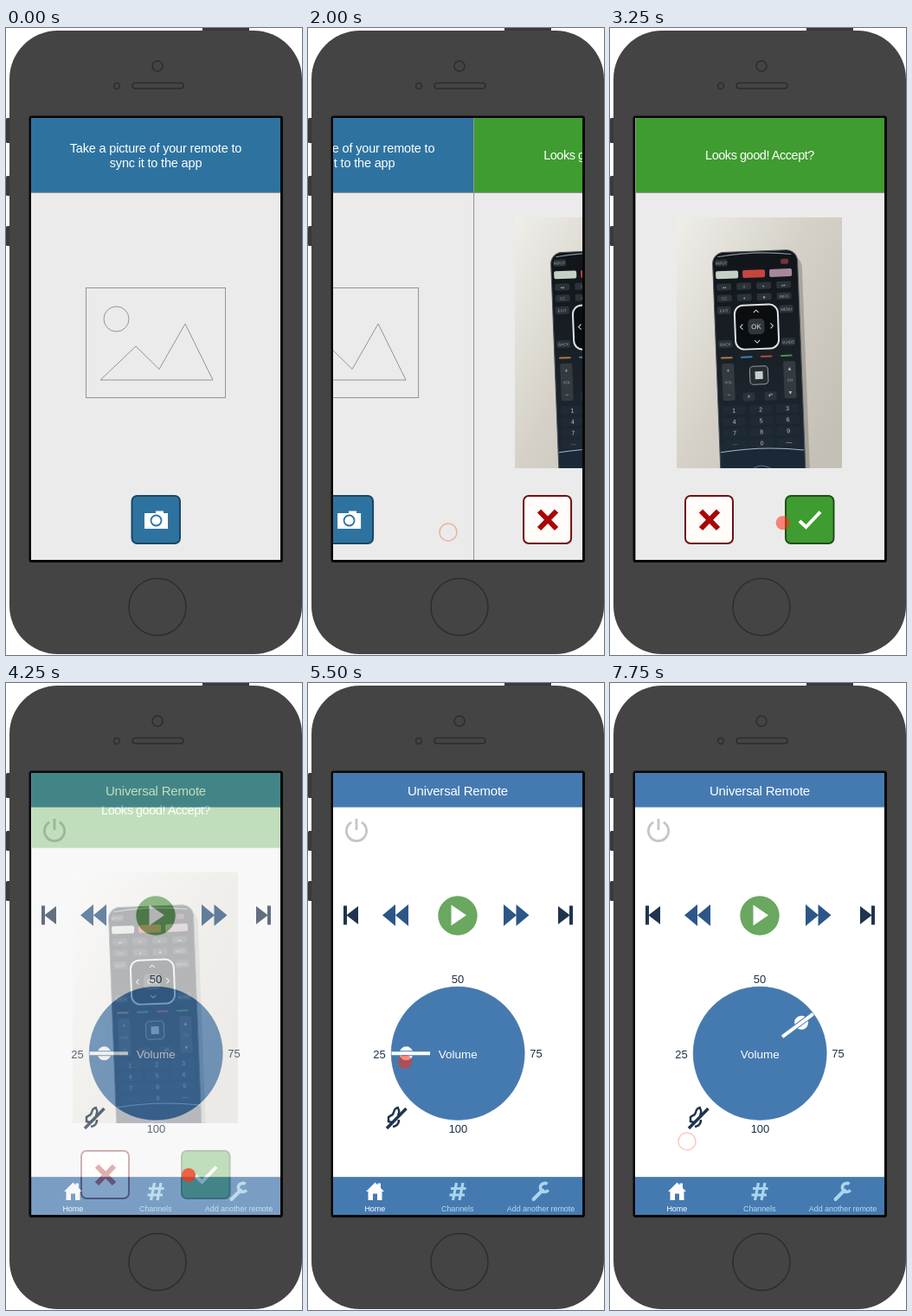
An HTML page that plays this animation: 342 by 725 pixels, repeating every 8 s.

```html
<!DOCTYPE html>
<html lang="en">
<head>
<meta charset="utf-8">
<title>Remote app demo</title>
<style>
html, body { margin: 0; width: 100%; height: 100%; overflow: hidden; background: #fff; }
svg { display: block; width: 342px; height: 725px; font-family: "Liberation Sans", Arial, sans-serif; -webkit-font-smoothing: antialiased; }
text { text-anchor: middle; }
.line { fill: none; stroke: #949494; }
.trim { fill: none; stroke: #2d2d2d; stroke-width: 1.5; }
.title { fill: #fff; font-size: 14.5px; }
.num { fill: #1d3149; font-size: 13px; }
.tab { font-size: 9px; letter-spacing: -.07px; }
.key { fill: #c3c8cb; font-size: 7px; }
.tiny { fill: #9ea5aa; font-size: 4.5px; }
</style>
</head>
<body>
<svg viewBox="0 0 342 725">
  <defs>
    <clipPath id="view"><rect x="29" y="104" width="288" height="511"/></clipPath>
    <clipPath id="crop"><rect x="77" y="219" width="191" height="290"/></clipPath>
    <linearGradient id="wall" x1="0" y1="0" x2="1" y2=".8">
      <stop offset="0" stop-color="#efeee9"/><stop offset=".5" stop-color="#d5d1c8"/><stop offset="1" stop-color="#c5c0b6"/>
    </linearGradient>
    <linearGradient id="shell" x1="0" y1="0" x2="0" y2="1">
      <stop offset="0" stop-color="#11151a"/><stop offset=".5" stop-color="#1b2229"/><stop offset="1" stop-color="#1c2c3e"/>
    </linearGradient>
  </defs>

  <!-- phone -->
  <g fill="#3a3a3a">
    <rect x="227" width="54" height="6"/>
    <rect y="104" width="7" height="29" rx="1.5"/>
    <rect y="171" width="7" height="23" rx="1.5"/>
    <rect y="229" width="7" height="23" rx="1.5"/>
  </g>
  <rect x="4" y="3" width="338" height="721" rx="56" fill="#444"/>
  <g class="trim">
    <circle cx="175" cy="44" r="6"/>
    <circle cx="128" cy="67" r="3.4"/>
    <rect x="146" y="63.500" width="59" height="6.500" rx="3.200"/>
    <circle cx="175" cy="669.500" r="33"/>
  </g>
  <rect x="26.500" y="101.500" width="293.500" height="516.500" rx="3" fill="#080808"/>

  <g clip-path="url(#view)">
    <!-- take picture -->
    <g id="take">
      <rect x="29" y="104" width="288" height="511" fill="#ebebeb"/>
      <rect x="29" y="104" width="288" height="86" fill="#2e73a0"/>
      <path class="line" d="M29 190.500H317"/>
      <g class="title" letter-spacing="-.17">
        <text x="173" y="144">Take a picture of your remote to</text>
        <text x="173" y="161">sync it to the app</text>
      </g>
      <g class="line">
        <rect x="92.500" y="300.500" width="161" height="127"/>
        <circle cx="127.500" cy="336.500" r="14.500"/>
        <path d="M109 407L150 368L177 394.500L207 342L239 407Z"/>
      </g>
      <rect x="145.500" y="541" width="55.500" height="55" rx="6" fill="#2e73a0" stroke="#1b4765" stroke-width="2"/>
      <path d="M160 561H173V558.500H182V561H187V579H160Z" fill="#fff"/>
      <circle cx="173.500" cy="569.500" r="6" fill="#fff" stroke="#2e73a0" stroke-width="1.800"/>
    </g>

    <!-- accept picture -->
    <g id="accept">
      <rect x="29" y="104" width="288" height="511" fill="#ebebeb"/>
      <rect x="29" y="104" width="288" height="86" fill="#3f9c30"/>
      <path class="line" d="M29 190.500H317M29.500 104V615"/>
      <text class="title" x="173" y="152" letter-spacing="-.46">Looks good! Accept?</text>
      <g clip-path="url(#crop)">
        <rect x="77" y="219" width="191" height="290" fill="url(#wall)"/>
        <g id="remote" transform="rotate(-2.200 172 385)">
          <rect x="124" y="264" width="102" height="290" rx="15" fill="#79736a" opacity=".45"/>
          <rect x="123" y="258" width="98" height="290" rx="13" fill="url(#shell)" stroke="#4b5257"/>
          <path d="M129 263Q172 257 214 263" fill="none" stroke="#8d9496" stroke-width="1.200"/>
          <rect x="146" y="320" width="50" height="51" rx="10" fill="#0b0e11" stroke="#dfe3e4" stroke-width="2"/>
          <rect x="161" y="336" width="19" height="18" rx="5" fill="#30363b"/>
          <text x="170.500" y="348" fill="#dde1e3" font-size="8">OK</text>
          <path d="M168 329l3-3 3 3M168 361l3 3 3-3M155 342l-3 3 3 3M187 342l3 3-3 3" fill="none" stroke="#d2d6d8"/>
          <rect x="161" y="391" width="21" height="21" rx="4" fill="#252c32" stroke="#969da1"/>
          <rect x="167" y="397" width="9" height="9" fill="#c9cccd"/>
          <path d="M124 489Q172 483 220 490" fill="none" stroke="#a7b6c3"/>
          <path d="M157 512q13-12 27 0" fill="none" stroke="#5f7388"/>
        </g>
      </g>
      <rect x="87" y="541" width="55" height="55" rx="6" fill="#fffcfa" stroke="#6c1111" stroke-width="2"/>
      <path d="M105 558.500L125 579M125 558.500L105 579" stroke="#a90606" stroke-width="6"/>
      <rect x="203" y="541" width="55.500" height="55" rx="6" fill="#3f9c30" stroke="#205018" stroke-width="2"/>
      <path d="M219 570L226.500 577L243 559.500" fill="none" stroke="#fff" stroke-width="4"/>
    </g>

    <!-- remote control -->
    <g id="home">
      <rect x="29" y="104" width="288" height="511" fill="#fff"/>
      <path d="M29 104H317V143H29ZM29 571.500H317V615H29Z" fill="#457ab1"/>
      <path d="M29 143.500H317M29 571.500H317" stroke="#386798" opacity=".6"/>
      <text x="173" y="129.500" fill="#fff" font-size="15" letter-spacing="-.2">Universal Remote</text>
      <path d="M50.200 161A11.600 11.600 0 1 0 61.800 161M56 157V170" fill="none" stroke="#c5c5c5" stroke-width="2.800"/>
      <path d="M41 257.500H45V268L58 258V279L45 269V279.500H41ZM306 257.500H302V268L289 258V279L302 269V279.500H306Z" fill="#1f344d"/>
      <path d="M101 256V281L86 268.500ZM116 256V281L101 268.500ZM226 256V281L241 268.500ZM240.500 256V281L255.500 268.500Z" fill="#2d5688"/>
      <circle cx="173" cy="269" r="22.700" fill="#6aa75f"/>
      <path d="M165.500 256.500V280.500L183 268.500Z" fill="#fff"/>
      <circle cx="173.200" cy="428.300" r="77" fill="#457ab1" stroke="#39699c" stroke-width=".6"/>
      <g id="knob">
        <circle cx="113.500" cy="428.300" r="8" fill="#fff"/>
        <path d="M100 428.300H141" stroke="#457ab1" stroke-width="6"/>
        <path d="M96.500 428.300H141" stroke="#fff" stroke-width="4"/>
      </g>
      <text x="173.300" y="434" fill="#fff" font-size="13.500">Volume</text>
      <g class="num">
        <text x="173" y="347">50</text>
        <text x="82.500" y="433.500">25</text>
        <text x="263.500" y="433">75</text>
        <text x="173.500" y="520">100</text>
      </g>
      <g fill="none" stroke="#1f344d">
        <path d="M91 515L113.500 492" stroke-width="3.500"/>
        <path d="M105 491C97 491 101 499 96 500L93 502V507L97 508M103 491Q107 494 104 500M105 505Q105 512 98 513" stroke-width="2.500"/>
      </g>
      <path d="M67 588L77.500 577.500L80.500 580.500V578.500H84V584L88 588H85.500V598H80V590.500H75V598H69.500V588Z" fill="#fff"/>
      <path d="M171.500 578L167.500 598M179 578L175 598M165 584.500H182.500M163.500 592H181" stroke="#a9d6ec" stroke-width="3.200"/>
      <path d="M260.500 597L271 586.500" stroke="#a9d6ec" stroke-width="4" stroke-linecap="round"/>
      <path d="M276 579A5 5 0 1 0 278 585.500" transform="rotate(8 273 583)" fill="none" stroke="#a9d6ec" stroke-width="3.600"/>
      <g class="tab" fill="#b5dcef">
        <text x="77.300" y="611" fill="#fff">Home</text>
        <text x="172.700" y="611">Channels</text>
        <text x="269" y="611">Add another remote</text>
      </g>
    </g>
    <circle id="dot" r="8" fill="#ff2d14"/>
    <circle id="ring" r="10" fill="none" stroke="#ff6450" stroke-width="1.500"/>
  </g>
</svg>
<script>
const LOOP = 8000, STEP = 250, WIDTH = 288;
const $ = id => document.getElementById(id);
const clamp = v => Math.max(0, Math.min(1, v));
const span = (t, from, to) => clamp((t - from) / (to - from));
const ease = p => p * p * (3 - 2 * p);

function add(tag, attrs, label) {
  const node = document.createElementNS("http://www.w3.org/2000/svg", tag);
  for (const name in attrs) node.setAttribute(name, attrs[name]);
  if (label) node.textContent = label;
  $("remote").appendChild(node);
}
const key = (x, y, w, h, fill) => add("rect", { x: x - w / 2, y: y - h / 2, width: w, height: h, rx: 2, fill });
const label = (x, y, s, cls) => add("text", { x, y, class: cls }, s);

function buildRemote() {
  const dark = "#2b3238";
  const cols = [135, 158, 181, 204];
  key(133, 270, 14, 8, dark);
  label(133, 272, "INPUT", "tiny");
  key(206, 271, 9, 6, "#76333a");
  ["#c5d0c4", "#c6453f", "#a8879e"].forEach((fill, i) => key(139 + i * 31, 284, 26, 9, fill));
  cols.forEach((x, i) => {
    key(x, 298, 17, 8, dark);
    label(x, 300, ["◂◂", "II", "▸", "▸▸"][i], "tiny");
    key(x, 311, 17, 8, dark);
    label(x, 313, ["CC", "●", "■", "INFO"][i], "tiny");
    key(x, 380, 14, 2, ["#b9783a", "#427fb6", "#b84b3f", "#4e9250"][i]);
  });
  [[134, 325, "EXIT"], [206, 326, "MENU"], [134, 364, "BACK"], [207, 364, "GUIDE"]].forEach(([x, y, s]) => {
    key(x, y, 16, 9, dark);
    label(x, y + 2, s, "tiny");
  });
  [[136, "+", "−", "VOL"], [207, "▴", "▾", "CH"]].forEach(([x, up, down, s]) => {
    key(x, 408, 14, 43, "#343b40");
    label(x, 397, up, "key");
    label(x, 410, s, "tiny");
    label(x, 425, down, "key");
  });
  [159, 184].forEach(x => {
    key(x, 426, 14, 10, dark);
    label(x, 428, x < 170 ? "×" : "↶", "key");
  });
  for (let i = 0; i < 12; i++) {
    const x = 141 + i % 3 * 31, y = 441 + Math.floor(i / 3) * 13;
    key(x, y, 27, 10, "#202a34");
    label(x, y + 2.5, i < 9 ? i + 1 : ["···", "0", "—"][i - 9], "key");
  }
}

const path = [
  [250, 243, 287], [750, 194, 410], [1250, 151, 573], [1500, 162, 583], [2700, 162, 583],
  [3500, 211, 569], [4600, 211, 569], [5000, 146, 509], [5250, 116, 455], [5500, 112, 438],
  [6300, 261, 362], [6700, 261, 362], [7300, 89, 530], [8000, 89, 530]
];

function pointer(t, drag) {
  if (t > 5500 && t < 6300) {
    const a = (171 + 152.400 * drag) * Math.PI / 180;
    const r = 62 + 70 * Math.sin(Math.PI * drag) + 48 * drag;
    return [173 + r * Math.cos(a), 428 + r * Math.sin(a)];
  }
  let i = 1;
  while (i < path.length - 1 && t > path[i][0]) i++;
  const [a, b] = [path[i - 1], path[i]];
  const p = ease(span(t, a[0], b[0]));
  return [a[1] + (b[1] - a[1]) * p, a[2] + (b[2] - a[2]) * p];
}

const ringAlpha = (t, start) => t < start ? 0 : Math.max(0, .65 - (t - start) * .0008);

function draw(t) {
  const slide = WIDTH * ease(span(t, 1738, 2310));
  $("take").setAttribute("transform", `translate(${-slide} 0)`);
  $("accept").setAttribute("transform", `translate(${WIDTH - slide} 0)`);
  $("home").setAttribute("opacity", span(t, 3650, 4540));

  const drag = ease(span(t, 5500, 6300));
  $("knob").setAttribute("transform", `rotate(${143.400 * drag} 173.2 428.3)`);

  const [x, y] = pointer(t, drag);
  const solid = (t >= 250 && t < 1750) || (t >= 2750 && t < 7375);
  const alpha = .55 + .15 * span(t, 3500, 4000) * (1 - span(t, 4600, 5200));
  const ring = t < 2750 ? ringAlpha(t, 1750) : ringAlpha(t, 7375);
  for (const id of ["dot", "ring"]) {
    $(id).setAttribute("cx", x);
    $(id).setAttribute("cy", y);
  }
  $("dot").setAttribute("opacity", solid ? alpha : 0);
  $("ring").setAttribute("opacity", ring);
}

function tick() {
  const t = performance.now() % LOOP;
  draw(Math.floor(t / STEP) * STEP);
  requestAnimationFrame(tick);
}

buildRemote();
tick();
</script>
</body>
</html>
```
